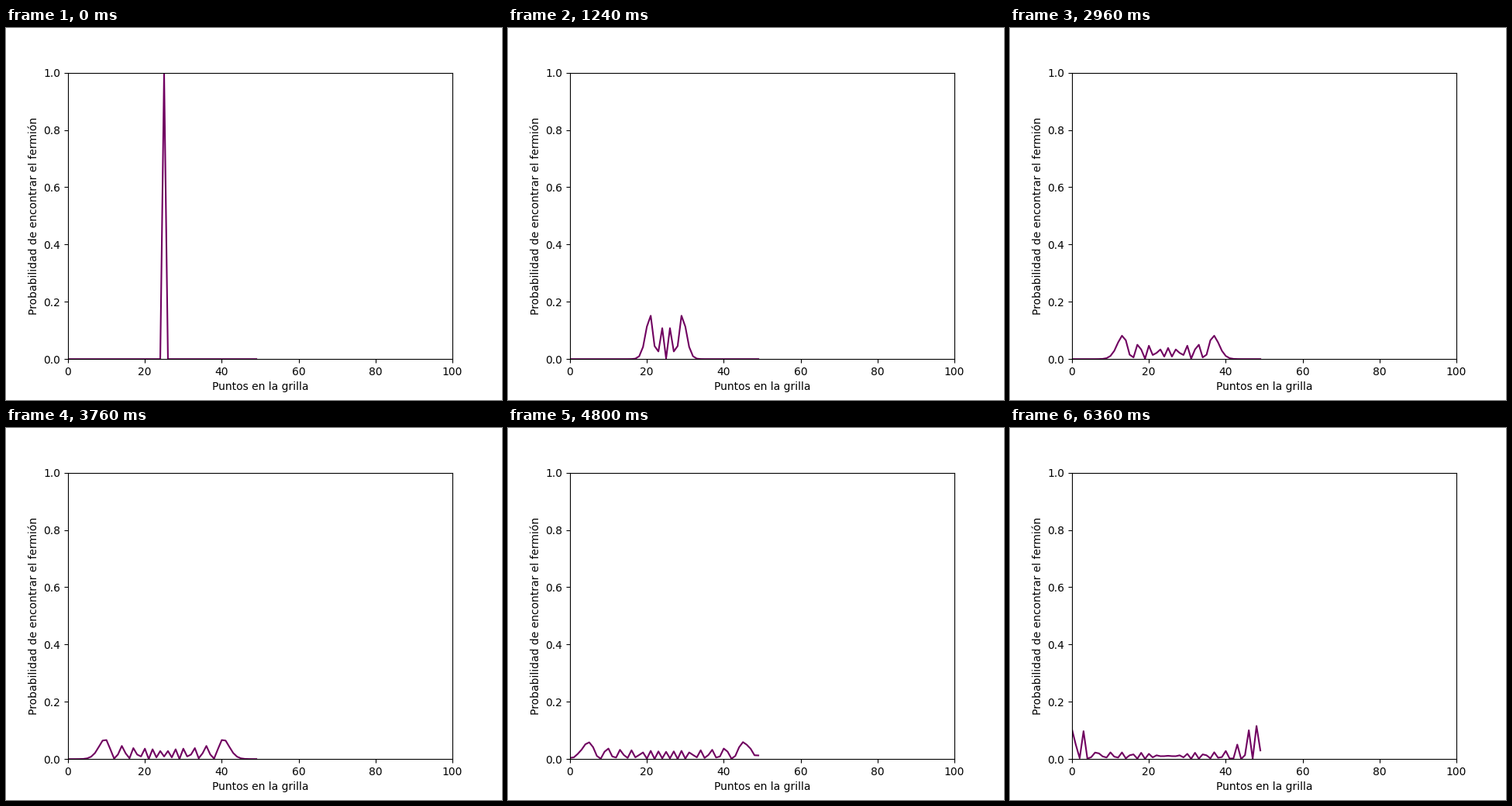
These frames come from a looping animation (640x480 px, 6.4 s). A matplotlib script:

```python
import numpy as np
import matplotlib.pyplot as plt
from matplotlib.animation import FuncAnimation

SITES, START = 50, 25
FRAMES, INTERVAL = 160, 40
T_END, HOPPING = 30, 0.5
LINE_COLOR = "#700060"

# Open chain with nearest-neighbour hopping
H = HOPPING * (np.eye(SITES, k=1) + np.eye(SITES, k=-1))
energy, modes = np.linalg.eigh(H)
times = np.linspace(0, T_END, FRAMES)
sites = np.arange(SITES)


def probability(t):
    psi = modes @ (np.exp(-1j * energy * t) * modes[START])
    return np.abs(psi) ** 2


fig, ax = plt.subplots(figsize=(6.4, 4.8), dpi=100)
ax.set_xlim(0, 100)
ax.set_ylim(0, 1)
ax.set_xlabel("Puntos en la grilla")
ax.set_ylabel("Probabilidad de encontrar el fermión")
line, = ax.plot(sites, probability(0), color=LINE_COLOR)


def update(i):
    # The initial state is held for one extra step
    line.set_ydata(probability(times[max(i - 1, 0)]))
    return line,


anim = FuncAnimation(fig, update, frames=FRAMES, interval=INTERVAL,
                     repeat=True, repeat_delay=0, blit=False)
plt.show()
```
